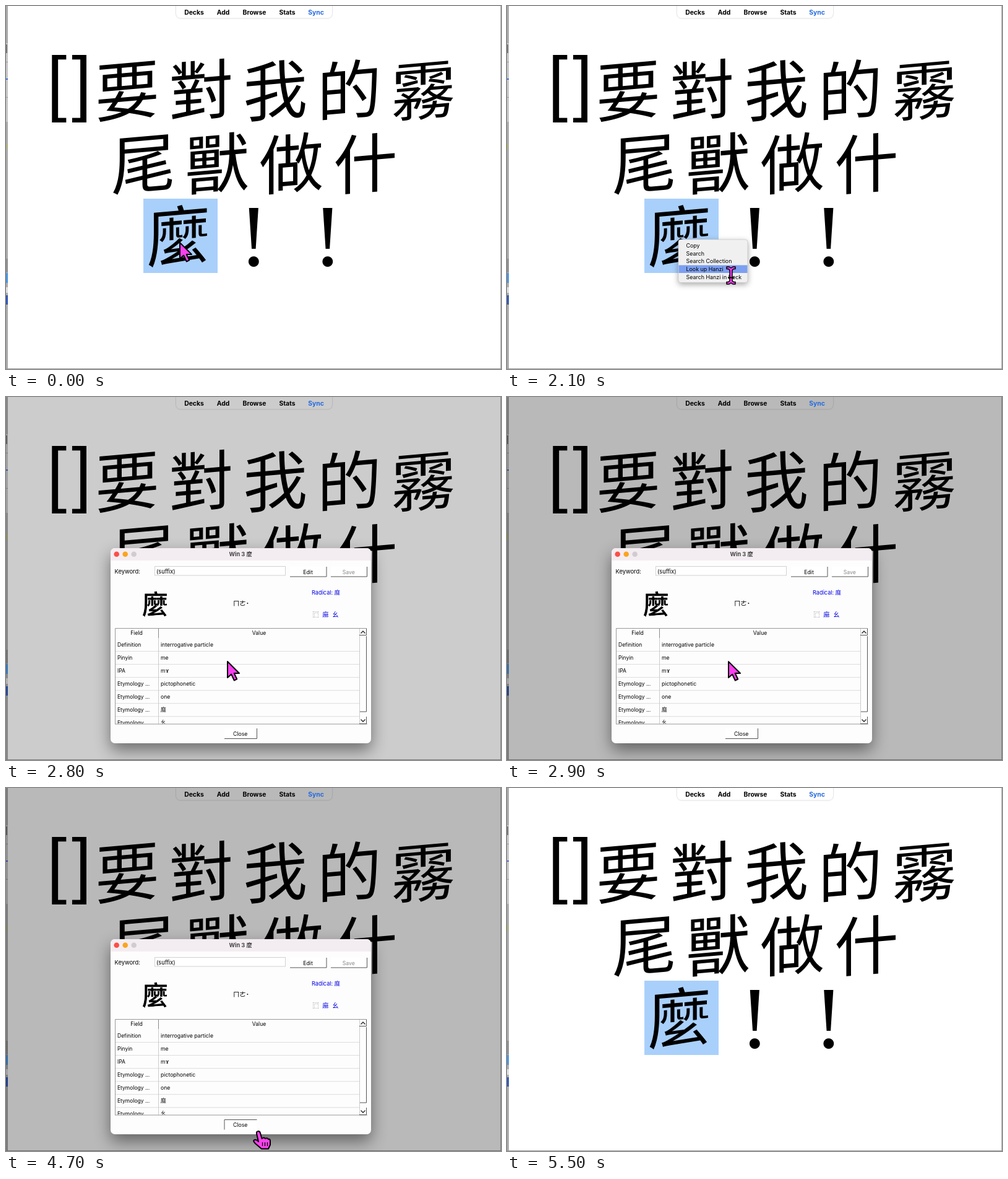
An HTML page that plays this animation: 800 px wide and 586 px high, repeating every 5.7 s.

```html
<!DOCTYPE html>
<html lang="zh-Hant">
<head>
<meta charset="utf-8">
<style>
html, body { margin: 0; width: 100%; height: 100%; overflow: hidden; background: #fff; }
svg { display: block; font-family: Inter, "Noto Sans CJK TC", sans-serif; }
.big { font-family: "Noto Sans CJK TC", "Noto Sans CJK", sans-serif; }
.cursor path { stroke: #000; stroke-width: 2; stroke-linejoin: round; fill: #f940ee; }
</style>
</head>
<body>
<svg id="stage" width="800" height="586" viewBox="0 0 800 586"></svg>
<script>
const text = (x, y, str, size = 9, more = '') =>
  `<text x="${x}" y="${y}" font-size="${size}" ${more}>${str}</text>`;
const mid = (x, y, str, size = 9, more = '') => text(x, y, str, size, 'text-anchor="middle" ' + more);
const rect = (x, y, w, h, fill, more = '') =>
  `<rect x="${x}" y="${y}" width="${w}" height="${h}" fill="${fill}" ${more}/>`;
const line = (d, color, more = '') => `<path d="${d}" fill="none" stroke="${color}" ${more}/>`;

// Brush-like row: each glyph leans upward to the right
const glyphs = (str, x, y) => [...str].map((ch, i) =>
  `<g class="big" transform="translate(${x + i * 119.6} ${y}) skewY(-5)">${mid(0, 39, ch, 104)}</g>`).join('');

const sentence = () =>
  rect(222, 311, 120, 120, '#a9d0fb') +
  text(66, 164, '[', 116, 'font-family="Liberation Sans, sans-serif"') +
  text(106, 164, ']', 116, 'font-family="Liberation Sans, sans-serif"') +
  glyphs('要對我的霧', 196, 136) + glyphs('尾獸做什', 222, 254) + glyphs('麼', 279, 370.5) +
  [400.5, 520].map(x => mid(x, 418.5, '!', 142, 'font-family="Liberation Serif, serif"')).join('');

const edges = () =>
  rect(0, 0, 3, 586, '#a9a9a9') + rect(0, 60, 3, 127, '#c6c6c6') +
  rect(0, 62, 2, 14, '#777') + rect(0, 90, 3, 1, '#999') + rect(0, 117, 3, 2, '#3f6fd0') +
  rect(0, 147, 3, 1, '#999') + rect(0, 222, 2, 8, '#b5b070') + rect(0, 408, 3, 22, '#909090') +
  rect(0, 431, 3, 16, '#4a94de') + rect(0, 454, 3, 9, '#ddd') + rect(0, 467, 3, 15, '#3157b4') +
  rect(799, 0, 1, 586, '#aaa') + rect(0, 585, 800, 1, '#999');

const toolbar = () => [['Decks', 304], ['Add', 351], ['Browse', 401.5], ['Stats', 454.5], ['Sync', 501]]
  .map(([s, x]) => mid(x, 13.5, s, 10.4, `font-weight="700" fill="${s == 'Sync' ? '#256add' : '#000'}"`)).join('');

const items = ['Copy', 'Search', 'Search Collection', 'Look up Hanzi', 'Search Hanzi in Deck'];
const rowTop = i => 380.6 + i * 12.6;
const menu = () =>
  rect(277, 377, 112, 69.5, '#f1f0f1', 'rx="4" stroke="#c4c4c4" stroke-width=".7" style="filter:drop-shadow(0 3px 5px #0005)"') +
  rect(277.5, 0, 111, 12.6, '#7c9ff0', 'id="hover"') +
  items.map((s, i) => text(289.5, rowTop(i) + 9.5, s, 8.9)).join('');

const button = (x, y, w, h, label, color = '#000', id = '') =>
  rect(x, y, w, h, '#fff') +
  line(`M${x} ${y + h}h${w}v${-h}`, '#555', id && `id="${id}"`) +
  mid(x + w / 2 - .5, y + h / 2 + 3.8, label, 8.7, `fill="${color}"`);

const rows = [['Definition', 'interrogative particle'], ['Pinyin', 'me'], ['IPA', 'mɤ'],
  ['Etymology ...', 'pictophonetic'], ['Etymology ...', 'one'], ['Etymology ...', '麻'], ['Etymology ...', '幺']];

const table = () =>
  `<clipPath id="clip">${rect(176, 373, 408, 154.5, '#000')}</clipPath><g clip-path="url(#clip)">` +
  rows.map(([name, value], i) => {
    const y = 403 + i * 21.05;
    return text(180, y, name, 8.5) + text(250, y, value, 8.7) +
      line(`M177 ${y + 7.5}H571`, '#ddd');
  }).join('') + '</g>' +
  mid(211, 384, 'Field', 8.6) + mid(409, 384, 'Value', 8.6) +
  line('M246.5 389V528M571.5 374V528', '#ccc') + line('M246.5 374V389', '#888') +
  line('M176.5 528V373.5H583M176 528H584', '#999') +
  line('M571 384.5H582.5V374M572 508H582.5V386M571 527.5H582.5V516', '#555') +
  line('M573.5 381.5l3.5 -3.5 3.5 3.5M573.5 520.5l3.5 3.5 3.5 -3.5', '#222', 'stroke-width="1.3"');

const dialog = () =>
  rect(169, 244, 421, 315, '#fdfdfd', 'rx="7" style="filter:drop-shadow(0 11px 13px #0007)"') +
  `<path d="M169 264v-13a7 7 0 0 1 7-7h407a7 7 0 0 1 7 7v13z" fill="#f3edf1"/>` +
  [[178.7, '#fc4f47'], [192.7, '#fba41f'], [206.7, '#d0cccf']].map(([x, c]) =>
    `<circle cx="${x}" cy="253.7" r="4.3" fill="${c}"/>`).join('') +
  mid(379, 257, 'Win 3 麼', 9.2, 'font-weight="700" fill="#444"') +
  text(175.5, 284.5, 'Keyword:', 9.4) +
  rect(240.5, 273.5, 211, 14.5, '#fff', 'stroke="#d2d2d2"') + text(243, 284.5, '(suffix)', 9.2) +
  button(459, 274, 59, 16, 'Edit') + button(525, 274, 58.5, 16, 'Save', '#888') +
  mid(241, 350, '麼', 42, 'class="big" stroke="#000" stroke-width=".9"') +
  mid(380, 336.5, 'ㄇㄜ˙', 10.5, 'class="big"') +
  mid(517, 319, 'Radical: 麻', 9.2, 'fill="#0000e6"') +
  mid(500.5, 355, '⿸', 10, 'class="big" fill="#333"') +
  ['麻', '幺'].map((s, i) => mid(516.5 + i * 16, 355, s, 10, 'fill="#0000e6"')).join('') +
  table() + button(353, 535, 52.5, 16.5, 'Close', '#000', 'closeEdge');

const cursors = {
  arrow: '<path d="M0 0V26L6.2 20.6 10.8 30.5 15.2 28.4 10.7 18.9H19Z"/>',
  hand: '<path d="M-2 4C-3-1 3-1 4 3L6.500 12Q10 9 12 12 15 10 17 13 20 12 20 16V22L17 28.500H6L-4 20Q-9 15-5 14 -2 13 1 17Z"/>' +
    '<path d="M7.500 18v6M11.500 18v6M15.500 18v6" style="stroke-width:1.3"/>',
  beam: '<path d="M-7-14H-3L0-12 3-14H7V-10.500H4L2-8.500V8.500L4 10.500H7V14H3L0 12-3 14H-7V10.500H-4L-2 8.500V-8.500L-4-10.500H-7Z" style="stroke-width:1.5"/>' +
    '<path d="M-5 3.500H5"/>'
};

document.getElementById('stage').innerHTML =
  edges() + sentence() +
  rect(275, -10, 252, 29.5, '#fff', 'rx="7" style="filter:drop-shadow(0 .5px 1px #0004)"') +
  rect(0, 0, 800, 586, '#000', 'id="dim"') + toolbar() +
  `<g id="menu">${menu()}</g><g id="dialog">${dialog()}</g>` +
  Object.keys(cursors).map(k => `<g class="cursor" id="${k}">${cursors[k]}</g>`).join('');

const el = id => document.getElementById(id);
const show = (id, on) => el(id).style.display = on ? '' : 'none';
const clamp = v => Math.max(0, Math.min(1, v));

// Cursor path: time, x, y
const path = [[0, 281, 382], [300, 281, 382], [700, 376, 453], [1200, 376, 454], [1600, 362, 430], [2000, 362, 430],
  [2100, 362, 435], [2600, 362, 435], [2700, 358, 427], [3700, 358, 428], [4300, 406, 552], [4500, 407, 554], [5700, 407, 554]];

function cursorAt(t) {
  const i = path.findIndex(p => p[0] > t);
  const [a, b] = [path[i - 1], path[i]];
  const k = clamp((t - a[0]) / (b[0] - a[0]));
  const e = k * k * (3 - 2 * k);
  return [a[1] + (b[1] - a[1]) * e, a[2] + (b[2] - a[2]) * e];
}

function draw(now) {
  const t = Math.floor(now % 5700 / 100) * 100;
  const [x, y] = cursorAt(t);
  const kind = t >= 4900 ? '' : t >= 2700 ? (y < 535 ? 'arrow' : 'hand') :
    t >= 2100 ? 'beam' : t >= 400 ? 'hand' : 'arrow';
  for (const k in cursors) show(k, k == kind);
  if (kind) el(kind).setAttribute('transform', `translate(${x} ${y})`);

  show('menu', t >= 300 && t < 2700);
  const row = t >= 2100 ? 3 : Math.floor((y - rowTop(0)) / 12.6);
  show('hover', t >= 400 && row >= 0 && row < items.length);
  el('hover').setAttribute('y', rowTop(row));

  const open = t >= 2700 && t < 4800;
  el('dim').setAttribute('opacity', open ? Math.min(.275, (t - 2600) / 1000) : 0);
  show('dialog', t >= 2700 && t < 4900);
  el('dialog').setAttribute('opacity', open ? 1 : .5);
  el('closeEdge').setAttribute('d', t >= 4600 ? 'M353 551.5v-16h52.5' : 'M353 551.5h52.5v-16.5');
}

function loop(now) {
  draw(now);
  requestAnimationFrame(loop);
}
draw(0);
requestAnimationFrame(loop);
</script>
</body>
</html>
```
